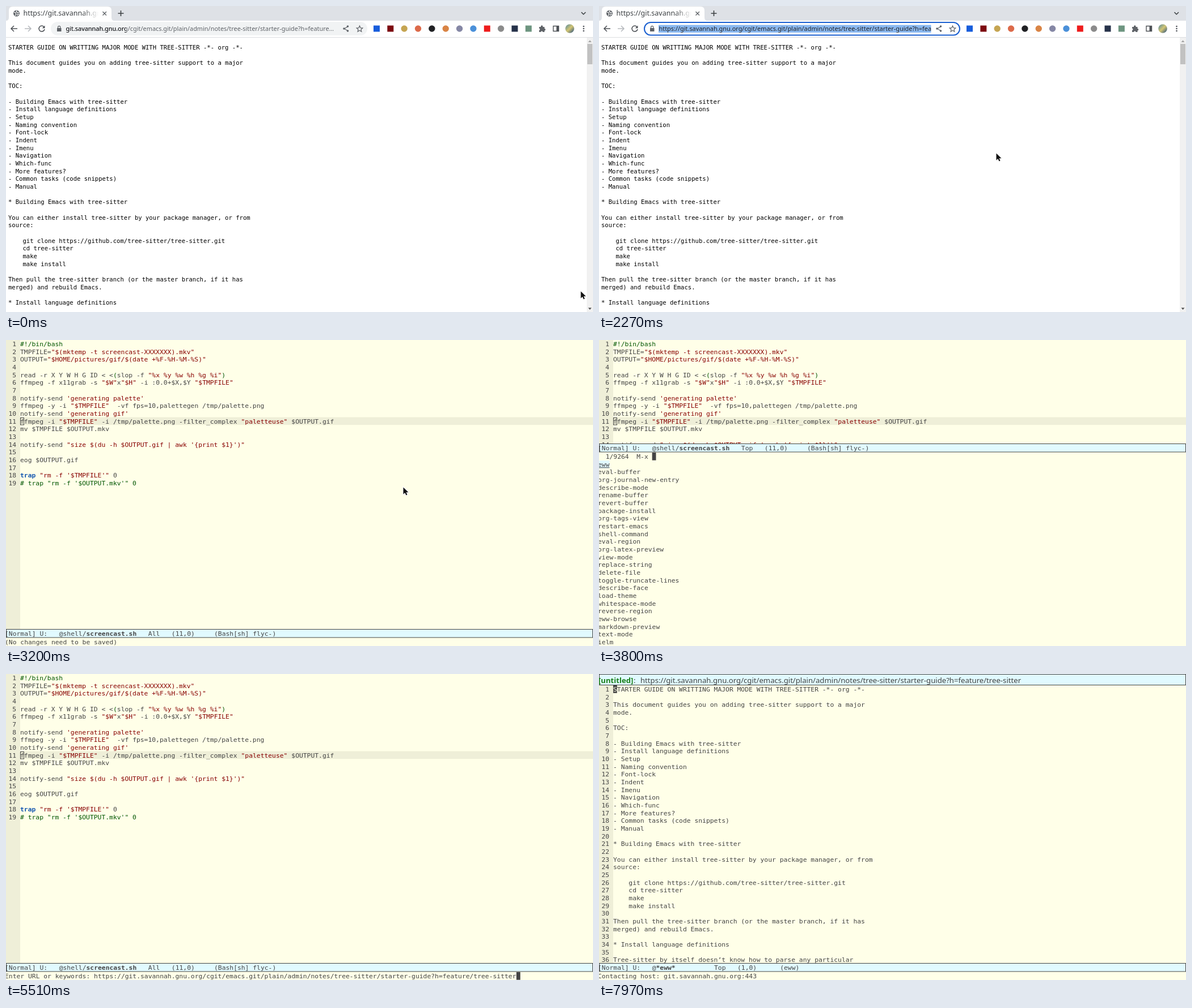
Write an HTML page with a canvas that moves like this. It is 1035 px wide and 541 px high and loops after 8 s.

```html
<!DOCTYPE html>
<html lang="en">
<head>
<meta charset="utf-8">
<title>Screencast</title>
<style>
html, body { margin: 0; width: 100%; height: 100%; overflow: hidden; background: #fff; }
canvas { display: block; width: 1035px; height: 541px; }
</style>
</head>
<body>
<canvas id="stage" width="1035" height="541"></canvas>
<script>
const W = 1035, H = 541, LOOP = 8000;
const ctx = document.getElementById('stage').getContext('2d');

const MONO = '"DejaVu Sans Mono", monospace', SANS = '"Noto Sans", sans-serif';
const PAGE_FONT = `10.58px ${MONO}`, CODE_FONT = `11.35px ${MONO}`;
const CELL = 6.833, ROW = 13.67, GUTTER = 25, MINI_X = -2;

const INK = '#444444', PAPER = '#ffffe8', SHADE = '#efefd8', BAR = '#e1faff',
      MATCH = '#a8efeb', RED = '#880000', GREEN = '#005500', BLUE = '#1054af';

// Event times in ms
const AT = { move: 60, rest: 800, focus: 1000, editor: 3200, active: 3300, prompt: 3680,
             e: 3900, ew: 4030, ask: 4840, paste: 5200, load: 5840, show: 7340 };

const PATH = 'git.savannah.gnu.org/cgit/emacs.git/plain/admin/notes/tree-sitter/starter-guide?h=feature';
const URL_TEXT = `https://${PATH}/tree-sitter`;

const GUIDE = `STARTER GUIDE ON WRITTING MAJOR MODE WITH TREE-SITTER -*- org -*-

This document guides you on adding tree-sitter support to a major
mode.

TOC:

- Building Emacs with tree-sitter
- Install language definitions
- Setup
- Naming convention
- Font-lock
- Indent
- Imenu
- Navigation
- Which-func
- More features?
- Common tasks (code snippets)
- Manual

* Building Emacs with tree-sitter

You can either install tree-sitter by your package manager, or from
source:

    git clone https://github.com/tree-sitter/tree-sitter.git
    cd tree-sitter
    make
    make install

Then pull the tree-sitter branch (or the master branch, if it has
merged) and rebuild Emacs.

* Install language definitions

Tree-sitter by itself doesn’t know how to parse any particular`.split('\n');

const SCRIPT = `#!/bin/bash
TMPFILE="$(mktemp -t screencast-XXXXXXX).mkv"
OUTPUT="$HOME/pictures/gif/$(date +%F-%H-%M-%S)"

read -r X Y W H G ID < <(slop -f "%x %y %w %h %g %i")
ffmpeg -f x11grab -s "$W"x"$H" -i :0.0+$X,$Y "$TMPFILE"

notify-send 'generating palette'
ffmpeg -y -i "$TMPFILE"  -vf fps=10,palettegen /tmp/palette.png
notify-send 'generating gif'
ffmpeg -i "$TMPFILE" -i /tmp/palette.png -filter_complex "paletteuse" $OUTPUT.gif
mv $TMPFILE $OUTPUT.mkv

notify-send "size $(du -h $OUTPUT.gif | awk '{print $1}')"

eog $OUTPUT.gif

trap "rm -f '$TMPFILE'" 0
# trap "rm -f '$OUTPUT.mkv'" 0`.split('\n');

const MATCHES = `eww
org-journal-new-entry
org-tags-view
org-latex-preview
view-mode
eww-browse
markdown-preview
org-agenda-week-view
indent-new-comment-line (comment-indent-new-line)
org-journal-schedule-view
org-preview-latex-fragment (org-toggle-latex-fragment)
ps-view
newline
tab-new (tab-bar-new-tab)
view-file
eww-reload
eww-submit
eww-up-url
tab-new-to (tab-bar-new-tab-to)
eww-top-url
mml-preview
view-buffer
c-guess-view
dired-do-eww`.split('\n');

const COMMANDS = `eww
eval-buffer
org-journal-new-entry
describe-mode
rename-buffer
revert-buffer
package-install
org-tags-view
restart-emacs
shell-command
eval-region
org-latex-preview
view-mode
replace-string
delete-file
toggle-truncate-lines
describe-face
load-theme
whitespace-mode
reverse-region
eww-browse
markdown-preview
text-mode
ielm`.split('\n');

function rect(x, y, w, h, color) {
  ctx.fillStyle = color;
  ctx.fillRect(x, y, w, h);
}

function text(s, x, y, color = INK, font = CODE_FONT) {
  ctx.font = font;
  ctx.fillStyle = color;
  ctx.fillText(s, x, y);
}

function disc(x, y, r, color) {
  ctx.fillStyle = color;
  ctx.beginPath();
  ctx.arc(x, y, r, 0, Math.PI * 2);
  ctx.fill();
}

function pill(x, y, w, h, r, fill, stroke) {
  ctx.beginPath();
  ctx.roundRect(x, y, w, h, r);
  ctx.fillStyle = fill;
  ctx.fill();
  if (stroke) { ctx.strokeStyle = stroke; ctx.lineWidth = 2; ctx.stroke(); }
}

function path(d, color, width = 1.5) {
  const p = new Path2D(d);
  if (width) { ctx.strokeStyle = color; ctx.lineWidth = width; ctx.stroke(p); }
  else { ctx.fillStyle = color; ctx.fill(p); }
}

function clipped(x, y, w, h, draw) {
  ctx.save();
  ctx.beginPath();
  ctx.rect(x, y, w, h);
  ctx.clip();
  draw();
  ctx.restore();
}

function pointer(x, y) {
  ctx.save();
  ctx.translate(x, y);
  const arrow = 'M0 0V12.2L2.9 9.5L5 14L7 13L5 8.8H9Z';
  path(arrow, '#fff', 2);
  path(arrow, '#111', 0);
  ctx.restore();
}

// ---- Browser ----

function tabStrip() {
  rect(0, 0, W, 26, '#dee1e6');
  path('M0 26Q5 26 5 20V8Q5 1 12 1H179Q186 1 186 8V20Q186 26 191 26Z', '#fff', 0);
  disc(18.5, 13, 5.5, '#5f6368');
  path('M14 11L17 12L18 15L16 17M19 8L18 10L21 12L23 11M20 17L21 14L23 15', '#fff', 1.2);
  const fade = ctx.createLinearGradient(135, 0, 163, 0);
  fade.addColorStop(0, '#3c4043');
  fade.addColorStop(1, '#3c404300');
  clipped(30, 2, 133, 22, () => text('https://git.savannah.gnu', 30.5, 17, fade, `12.5px ${SANS}`));
  path('M170.5 10L177 16.5M177 10L170.5 16.5', '#5f6368', 1.4);
  path('M197.5 13H207.5M202.5 8V18', '#3c4043', 1.6);
  path('M1014.5 11L1018.2 14.7L1022 11', '#3c4043', 1.6);
}

function toolbarIcons() {
  path('M20 40H9.5M14 35L9 40L14 45', '#4d5156');
  path('M33 40H43.5M39 35L44 40L39 45', '#b6b9bd');
  path('M67.2 37.2A5 5 0 1 0 68 41', '#4d5156');
  path('M68.5 34.5V39.2H63.8Z', '#4d5156', 0);

  path('M597 39.7L602.5 36.5M597 40.6L602.5 43.8', '#5f6368', 1.2);
  for (const [x, y] of [[596, 40], [602.5, 36], [602.5, 44]]) disc(x, y, 1.8, '#5f6368');
  let star = '';
  for (let i = 0; i < 10; i++) {
    const a = i * Math.PI / 5 - Math.PI / 2, r = i % 2 ? 2.6 : 5.6;
    star += `${i ? 'L' : 'M'}${623.5 + r * Math.cos(a)} ${40.7 + r * Math.sin(a)}`;
  }
  path(star + 'Z', '#5f6368', 1.2);

  const marks = ['#175ddc', '#7c0a10', '#c5a552', '#dc6a4a', '#202124', '#d98445',
                 '#8587a5', '#4a90d9', '#ee1c1c', '#8b8b8b', '#26324a', '#6d9580'];
  const square = new Set([0, 1, 8, 10, 11]);
  marks.forEach((color, i) => {
    const x = 653.5 + i * 24.35;
    if (square.has(i)) rect(x - 5.5, 34.5, 11, 11, color);
    else disc(x, 40, 5.7, color);
  });

  path('M940 37H943V36A1.8 1.8 0 0 1 946.6 36V37H949.5V40A1.8 1.8 0 0 1 949.5 43.6V46H946.5A1.8 1.8 0 0 0 943 46H940V43A1.8 1.8 0 0 0 940 39.5Z', '#5f6368', 0);
  path('M965 35.5H974.5V44.5H965Z', '#4d5156', 1.4);
  rect(970.5, 35, 4, 10, '#4d5156');
  const photo = ctx.createLinearGradient(987, 33, 1001, 47);
  photo.addColorStop(0, '#5d8f9e');
  photo.addColorStop(0.5, '#d3c573');
  photo.addColorStop(1, '#31577e');
  disc(994, 40, 7.8, photo);
  for (const y of [36, 40, 44]) disc(1018.5, y, 1.3, '#4d5156');
}

function addressBar(focused) {
  const font = `10.9px ${SANS}`;
  if (focused) pill(80, 29, 556, 22.5, 11.2, '#fff', '#1a5fd0');
  else pill(79, 28, 558, 24, 12, '#f1f3f4');
  rect(90, 39, 7.5, 6, '#5f6368');
  path('M91.6 39V37.5A2.1 2.1 0 0 1 95.8 37.5V39', '#5f6368', 1.2);
  if (focused) {
    rect(105, 33.5, 480.5, 13.5, '#8ab8f0');
    clipped(105, 30, 480.5, 20, () => text(URL_TEXT, 105.5, 44, '#202124', font));
  } else {
    text(PATH + '…', 105.5, 44, '#5f6368', font);
    clipped(105, 30, 107, 20, () => text('git.savannah.gnu.org', 105.5, 44, '#202124', font));
  }
}

function browser(t) {
  rect(0, 0, W, H, '#fff');
  tabStrip();
  addressBar(t >= AT.focus);
  toolbarIcons();
  rect(0, 55, W, 1, '#dcdee1');

  GUIDE.slice(0, 34).forEach((line, i) => text(line, 4, 77 + i * ROW, '#000', PAGE_FONT));

  rect(1024, 56, 11, 485, '#f1f1f1');
  rect(1025, 67, 9, 36, '#c1c1c1');
  path('M1026.5 64L1029.5 60.5L1032.5 64Z', '#a3a3a3', 0);
  path('M1026.5 533.5L1029.5 537L1032.5 533.5Z', '#505050', 0);

  const p = Math.min(1, Math.max(0, (t - AT.move) / (AT.rest - AT.move)));
  const k = p * p * (3 - 2 * p);
  pointer(1013.5 - 313 * k, 504.5 - 244 * k);
}

// ---- Editor ----

function codeLine(line, x, y) {
  if (line[0] === '#') return text(line, x, y, GREEN);
  let col = 0;
  for (const part of line.match(/"[^"]*"|'[^']*'|^trap|\(|\)|[^"'()]+/g) || []) {
    const keyword = part === 'trap';
    const color = /^["']/.test(part) ? RED : keyword ? BLUE : /[()]/.test(part) ? GREEN : INK;
    text(part, x + col * CELL, y, color, keyword ? 'bold ' + CODE_FONT : CODE_FONT);
    col += part.length;
  }
}

function buffer(lines, top, bottom, drawLine) {
  clipped(0, top, W, bottom - top, () => {
    rect(0, top, GUTTER, bottom - top, SHADE);
    lines.forEach((line, i) => {
      const y = top + 11 + i * ROW;
      text(String(i + 1).padStart(2), GUTTER - 3 * CELL, y);
      drawLine(line, GUTTER, y);
    });
  });
}

function modeLine(y, name, nameCol, fields) {
  rect(0, y, W, 15, BAR);
  ctx.strokeStyle = INK;
  ctx.lineWidth = 1;
  ctx.strokeRect(0.5, y + 0.5, W - 1, 14.5);
  const put = (s, col, font) => text(s, MINI_X + col * CELL, y + 11.5, INK, font);
  put('[Normal] U:', 0);
  put(nameCol > 15 ? '@shell/' : '@', 14);
  put(name, nameCol, 'bold ' + CODE_FONT);
  for (const [s, col] of fields) put(s, col);
}

function miniLine(s, y, cursor) {
  text(s, MINI_X, y);
  if (cursor) rect(MINI_X + s.length * CELL, y - 11, CELL, ROW, INK);
}

function candidates(input) {
  const rows = input === 'ew' ? MATCHES : COMMANDS;
  const count = { '': '1/9264', e: '1/7518', ew: '1/309' }[input];
  miniLine(`${count.padStart(8)}  M-x ${input}`, 210, true);
  rows.forEach((row, i) => {
    const y = 223.7 + i * ROW;
    if (!i) rect(0, y - 10.5, MINI_X + row.length * CELL, ROW, BAR);
    if (input) {
      for (const m of row.matchAll(new RegExp(input, 'g')))
        rect(MINI_X + m.index * CELL, y - 10.5, input.length * CELL, ROW, MATCH);
    }
    text(row, MINI_X, y);
    if (!i) rect(0, y + 1.5, MINI_X + row.length * CELL, 1, INK);
  });
}

function scriptView(t) {
  const listing = t >= AT.prompt && t < AT.ask;
  const barY = listing ? 183 : 511;
  rect(0, 136.5, W, ROW, SHADE);
  const solid = t >= AT.active && t < AT.prompt;
  const cursorY = 137;
  if (solid) rect(GUTTER, cursorY, CELL, 13, INK);
  buffer(SCRIPT, 0, barY, codeLine);
  if (solid) {
    text('f', GUTTER, 147.7, PAPER);
  } else {
    ctx.strokeStyle = INK;
    ctx.lineWidth = 1;
    ctx.strokeRect(GUTTER + 0.5, cursorY + 0.5, 6, 12.5);
  }
  modeLine(barY, 'screencast.sh', 21, [[listing ? 'Top' : 'All', 37], ['(11,0)', 43], ['(Bash[sh] flyc-)', 54]]);

  if (t < AT.prompt) {
    miniLine('(No changes need to be saved)', 538);
    pointer(700.5, 260.5);
  } else if (listing) {
    candidates(t < AT.e ? '' : t < AT.ew ? 'e' : 'ew');
  } else {
    miniLine('Enter URL or keywords: ' + (t < AT.paste ? '' : URL_TEXT), 538, true);
  }
}

function webView(t) {
  const loaded = t >= AT.show;
  const lines = loaded ? GUIDE : [`Loading ${URL_TEXT}...`];
  buffer(lines, 20, 511, (line, x, y) => text(line, x, y));
  rect(GUTTER, 20, CELL, ROW, INK);
  text(lines[0][0], GUTTER, 31, PAPER);

  rect(0, 0, W, 20, BAR);
  ctx.strokeStyle = INK;
  ctx.lineWidth = 1;
  ctx.strokeRect(0.5, 0.5, W - 1, 19);
  const font = `13.15px ${SANS}`;
  text('[untitled]', -1, 15.5, '#1a7f1a', 'bold ' + font);
  text(':', 61, 15.5, INK, font);
  text(URL_TEXT, 73, 15.5, INK, font);

  modeLine(511, '*eww*', 15, [[loaded ? 'Top' : 'All', 30], ['(1,0)', 36], ['(eww)', 47]]);
  miniLine('Contacting host: git.savannah.gnu.org:443', 538);
}

function editor(t) {
  rect(0, 0, W, H, PAPER);
  if (t < AT.load) scriptView(t);
  else webView(t);
}

const start = performance.now();
function frame() {
  const t = (performance.now() - start) % LOOP;
  if (t < AT.editor) browser(t);
  else editor(t);
  requestAnimationFrame(frame);
}
frame();
</script>
</body>
</html>
```
